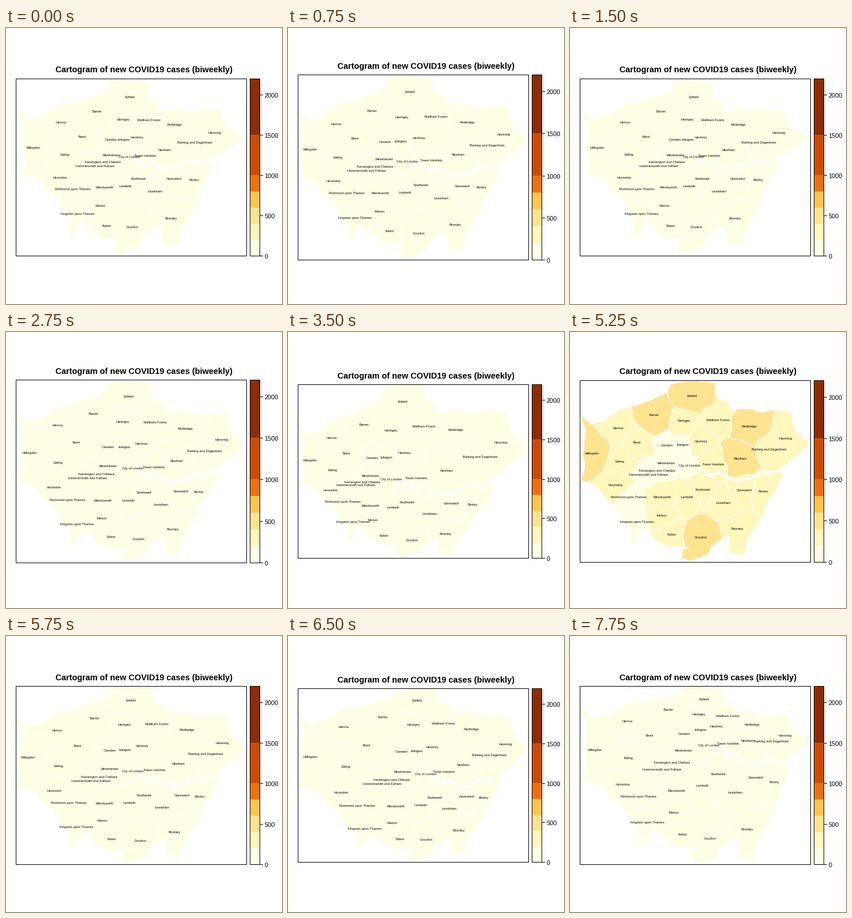
These frames come from a looping animation (480 px wide and 480 px high, 8000 ms). A matplotlib script:

```python
import matplotlib
import matplotlib.pyplot as plt
import numpy as np
from matplotlib.animation import FuncAnimation
from matplotlib.patches import Polygon, Rectangle

matplotlib.rcParams["font.family"] = "Liberation Sans"

SIZE, DPI = 480, 100
FRAMES, STEP = 32, 250
LEFT, RIGHT, MID_Y = 17.5, 418.5, 242.5
BREAKS = [0, 200, 400, 600, 800, 1000, 1500, 2200]
COLORS = ["#FFFFE5", "#FFF7BC", "#FEE391", "#FEC44F",
          "#EC7014", "#CC4C02", "#8C2D04"]
LOW, MEDIUM, HIGH = 150, 300, 460

# Label place and cases at the winter peak, the pose all others bend from.
BOROUGHS = {
    "Enfield": (212, 111, HIGH), "Barnet": (146, 144, HIGH),
    "Haringey": (198, 154, MEDIUM), "Waltham Forest": (257, 153, MEDIUM),
    "Redbridge": (312, 164, HIGH), "Havering": (375, 185, MEDIUM),
    "Harrow": (84, 167, MEDIUM), "Brent": (116, 192, MEDIUM),
    "Camden": (169, 197, LOW), "Islington": (196, 196, LOW),
    "Hackney": (228, 190, MEDIUM), "Barking and Dagenham": (346, 204, MEDIUM),
    "Hillingdon": (38, 211, HIGH), "Ealing": (86, 225, MEDIUM),
    "Westminster": (168, 228, LOW), "City of London": (208, 232, 20),
    "Tower Hamlets": (249, 230, MEDIUM), "Newham": (296, 220, HIGH),
    "Kensington and Chelsea": (151, 241, LOW),
    "Hammersmith and Fulham": (137, 248, LOW),
    "Hounslow": (79, 266, MEDIUM), "Richmond upon Thames": (102, 287, LOW),
    "Wandsworth": (161, 287, MEDIUM), "Lambeth": (204, 287, MEDIUM),
    "Southwark": (231, 274, MEDIUM), "Lewisham": (266, 297, MEDIUM),
    "Greenwich": (303, 275, MEDIUM), "Bexley": (336, 277, MEDIUM),
    "Merton": (159, 319, MEDIUM), "Kingston upon Thames": (116, 330, LOW),
    "Sutton": (177, 352, MEDIUM), "Croydon": (228, 357, HIGH),
    "Bromley": (291, 342, MEDIUM),
}
CITY_EDGE = [
    (20, 146), (36, 160), (57, 157), (86, 136), (122, 126), (168, 106),
    (175, 91), (206, 85), (252, 88), (253, 113), (277, 123), (277, 136),
    (312, 134), (332, 140), (353, 136), (384, 139), (386, 154), (393, 173),
    (417, 193), (396, 214), (362, 241), (370, 248), (354, 281), (338, 303),
    (337, 318), (309, 358), (304, 386), (278, 385), (276, 352), (246, 372),
    (240, 386), (208, 398), (194, 393), (193, 381), (208, 374), (170, 372),
    (150, 362), (125, 338), (111, 370), (104, 366), (106, 345), (88, 322),
    (80, 300), (62, 288), (50, 270), (20, 257), (27, 236), (23, 214), (28, 172)]
THAMES = [(222, 238), (240, 243), (248, 250), (257, 244), (270, 249), (284, 259),
          (300, 258), (318, 252), (332, 244), (348, 246), (366, 241)]

# How far the guide boroughs move away from the peak pose.
GUIDES = ["Enfield", "Redbridge", "Havering", "Harrow", "Hillingdon",
          "City of London", "Newham", "Hammersmith and Fulham", "Bexley",
          "Kingston upon Thames", "Croydon", "Bromley"]
PEAK = [(0, 0)] * len(GUIDES)
PLAIN = [(3, 9), (-19, 4), (-12, -3), (12, -3), (9, -3), (7, -8),
         (-20, -8), (18, -8), (-9, -13), (8, -7), (-8, -11), (-4, -11)]
SUMMER = [(-13, 10), (-20, 6), (-5, 7), (-8, 17), (0, 12), (-28, 24),
          (-20, 21), (-19, 18), (-15, 23), (-3, 0), (-12, 5), (-17, 9)]
AUTUMN = [(1, 1), (0, 4), (0, 2), (6, -5), (3, -1), (13, 5),
          (1, 4), (5, 6), (-1, 1), (7, 4), (3, 3), (-1, 1)]
SPRING = [(12, 1), (7, -2), (3, 3), (13, -9), (1, -1), (32, 8),
          (9, 4), (27, 9), (4, 4), (17, 5), (13, -3), (6, -4)]
MAY = [(21, -1), (5, -10), (-1, -12), (16, -19), (5, -13), (34, -42),
       (13, -38), (23, -16), (19, -23), (18, -6), (16, -5), (17, -6)]

# (step, pose, top of the panel)
KEYS = [(0, PLAIN, 88), (1, AUTUMN, 85), (3, PEAK, 81), (5, SPRING, 87),
        (6, PLAIN, 88), (10, PLAIN, 88), (11, AUTUMN, 83), (14, SUMMER, 91),
        (17, AUTUMN, 88), (21, PEAK, 84), (26, SPRING, 91), (31, MAY, 87)]
STEPS, POSES, TOPS = zip(*KEYS)
POSES = np.array(POSES, float)


def px(n):
    return n * 72 / DPI


def divide(path, closed=True, gap=5):
    """Add points to a path so that none are further apart than gap."""
    ends = path[1:] + path[:1] if closed else path[1:]
    out = []
    for p, q in zip(np.array(path, float), np.array(ends, float)):
        n = max(1, int(np.ceil(np.hypot(*(q - p)) / gap)))
        out += [p + (q - p) * k / n for k in range(n)]
    return np.array(out)


def wobble(pts):
    """Wavy shift that neighbouring borders share."""
    x, y = pts.T
    return pts + 1.3 * np.column_stack([
        np.sin(y / 5 + x / 9) + np.sin(y / 11 - x / 6),
        np.sin(x / 5 - y / 8) + np.sin(x / 12 + y / 6)])


def keep_side(poly, normal, limit):
    """Cut a convex polygon to the side where normal . p <= limit."""
    out = []
    for p, q in zip(poly, poly[1:] + poly[:1]):
        a, b = normal @ p - limit, normal @ q - limit
        if a <= 0:
            out.append(p)
        if a * b < 0:
            out.append(p + (q - p) * a / (a - b))
    return out


def cell(i):
    """Power-diagram cell: more cases claim more land."""
    poly = [np.array(c, float) for c in ((0, 60), (440, 60), (440, 420), (0, 420))]
    for j in range(len(sites)):
        if j != i:
            limit = sites[j] @ sites[j] - sites[i] @ sites[i] + pull[i] - pull[j]
            poly = keep_side(poly, 2 * (sites[j] - sites[i]), limit)
    return wobble(divide(poly))


def kernel(a, b):
    d2 = ((a[:, None] - b[None]) ** 2).sum(-1)
    return d2 * np.log(d2 + 1e-9) / 2


def make_warp(src, dst, soft=50):
    """Thin-plate spline that carries src to dst."""
    n = len(src)
    affine = np.column_stack([np.ones(n), src])
    system = np.zeros((n + 3, n + 3))
    system[:n, :n] = kernel(src, src) + soft * np.eye(n)
    system[:n, n:] = affine
    system[n:, :n] = affine.T
    w = np.linalg.solve(system, np.vstack([dst, np.zeros((3, 2))]))
    return lambda p: kernel(p, src) @ w[:n] + np.column_stack([np.ones(len(p)), p]) @ w[n:]


names = list(BOROUGHS)
sites = np.array([b[:2] for b in BOROUGHS.values()], float)
peak_cases = np.array([b[2] for b in BOROUGHS.values()])
pull = 2.2 * peak_cases
cells = [cell(i) for i in range(len(names))]
edge = divide(CITY_EDGE, gap=4)
edge += np.random.default_rng(5).uniform(-1, 1, edge.shape)
river = divide(THAMES, closed=False)
guides = sites[[names.index(g) for g in GUIDES]]
corners = np.array(CITY_EDGE, float)
west, north = corners.argmin(axis=0)
east, south = corners.argmax(axis=0)
tips = corners[[west, east, north, south]]


def state(i):
    """Panel top and the warp of the map at step i."""
    at = np.interp(i, STEPS, range(len(KEYS)))
    k = min(int(at), len(KEYS) - 2)
    moves = POSES[k] + (POSES[k + 1] - POSES[k]) * (at - k)
    top = round(np.interp(i, STEPS, TOPS)) + .5
    # The tips follow the nearest guide but always touch the panel.
    near = [np.hypot(*(guides - t).T).argmin() for t in tips]
    touch = tips + moves[near]
    touch[:2, 0] = LEFT + 2, RIGHT - 2
    touch[2:, 1] = top + 1, 2 * MID_Y - top - 2
    return top, make_warp(np.vstack([guides, tips]),
                          np.vstack([guides + moves, touch]))


def wave(i):
    """Size of the epidemic relative to the winter peak."""
    return np.exp(-abs(i - 21) / (4.5 if i < 21 else 1.4))


fig = plt.figure(figsize=(SIZE / DPI, SIZE / DPI), dpi=DPI, facecolor="white")
ax = fig.add_axes([0, 0, 1, 1])


def box(x, y, w, h, **style):
    return ax.add_patch(Rectangle((x, y), w, h, snap=False, **style))


def draw_key(top, bottom):
    def level(v):
        return np.floor(bottom - (bottom - top) * v / BREAKS[-1]) + .5

    for lo, hi, color in zip(BREAKS, BREAKS[1:], COLORS):
        box(424.5, level(hi), 17, level(lo) - level(hi), fc=color, lw=0)
    box(424.5, top, 17, bottom - top, fill=False, ec="black", lw=px(1), zorder=4)
    for v in range(0, 2001, 500):
        y = level(v)
        ax.plot([441.5, 446.5], [y, y], color="black", lw=px(1), snap=False)
        ax.text(449.5, y + 4.3, str(v), size=px(11))


def draw(i):
    ax.clear()
    ax.set(xlim=(0, SIZE), ylim=(SIZE, 0))
    ax.axis("off")
    top, warp = state(i)
    bottom = 2 * MID_Y - top

    city = ax.add_patch(Polygon(warp(edge), fill=False, lw=0))
    colors = np.searchsorted(BREAKS, peak_cases * wave(i), side="right") - 1
    for name, land, color, (x, y) in zip(names, cells, colors, warp(sites)):
        shape = ax.add_patch(Polygon(warp(land), fc=COLORS[color], ec="white",
                                     lw=px(1.2), joinstyle="round"))
        shape.set_clip_path(city)
        ax.text(x, y + 2.2, name, size=px(5.8), ha="center", zorder=5)
    ax.plot(*warp(river).T, color="white", lw=px(4.5), zorder=3)

    box(LEFT, top, RIGHT - LEFT, bottom - top, fill=False, ec="black",
        lw=px(1), zorder=4)
    draw_key(top, bottom)
    ax.text(240, top - 11, "Cartogram of new COVID19 cases (biweekly)",
            size=px(14.5), weight="bold", ha="center")
    return []


anim = FuncAnimation(fig, draw, frames=FRAMES, interval=STEP,
                     init_func=lambda: [], repeat=True, repeat_delay=0)
plt.show()
```
